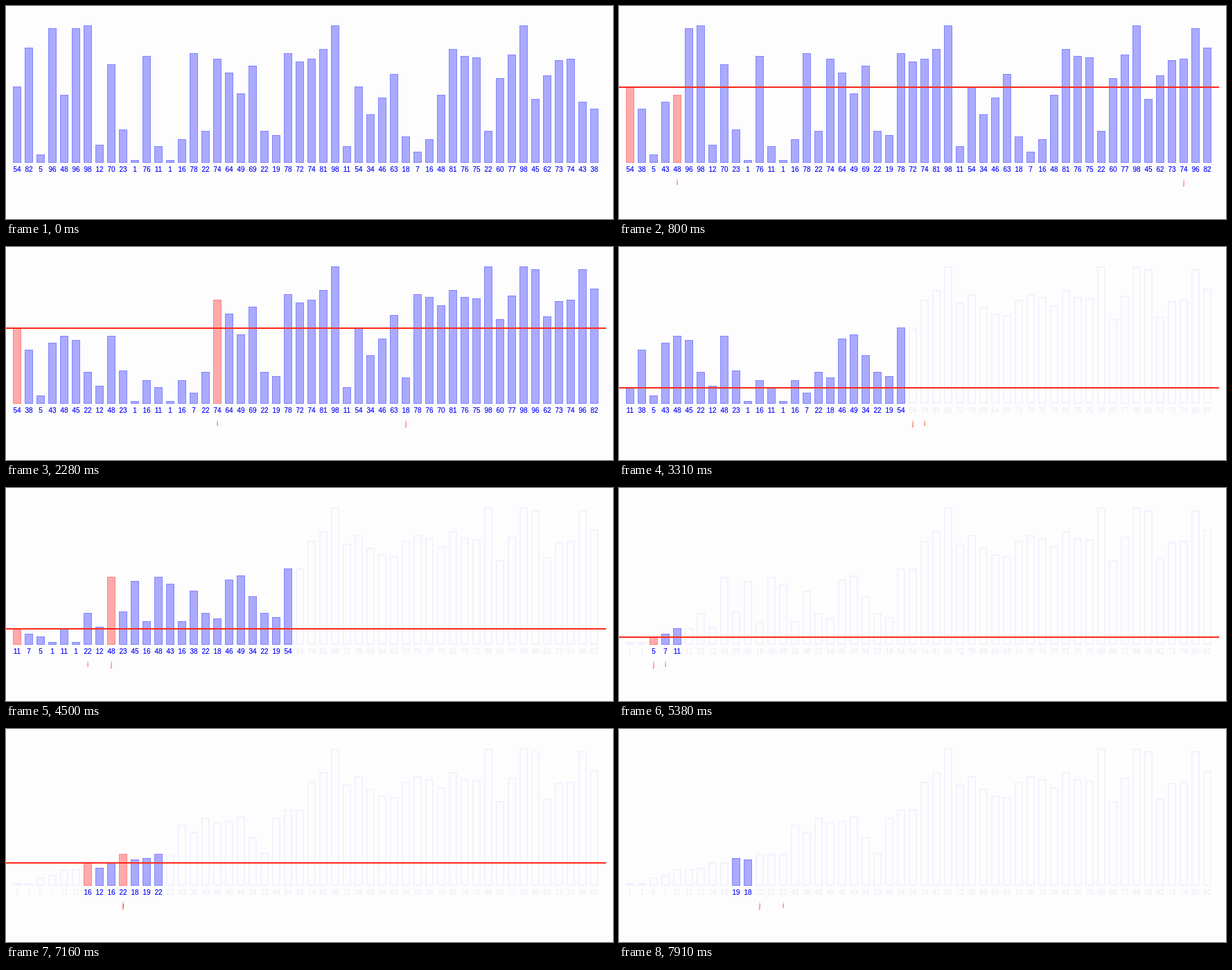
These frames come from a looping animation (876x307 px, 8 s). An HTML page:

```html
<!DOCTYPE html>
<html lang="en">
<head>
<meta charset="utf-8">
<title>Quicksort</title>
<style>
  html, body { margin: 0; width: 100%; height: 100%; overflow: hidden; background: #fdfdfd; }
  svg { display: block; width: 100%; height: 100%; }
  text { font: 10px "Liberation Sans", Arial, sans-serif; text-anchor: middle; }
  .bar rect { fill: #aaf; stroke: #8486ff; }
  .bar text { fill: #00f; stroke: #00f; stroke-width: .15; }
  .hot rect { fill: #faa; stroke: #ff8484; }
  .dim rect { fill: #fdfdfd; stroke: #f2f2ff; stroke-width: 2; }
  .dim text { fill: #e9e9f6; stroke: none; }
  .mark { fill: #ff3a2a; }
  .line { stroke: #ff2a1c; stroke-width: 2; }
</style>
</head>
<body>
<svg id="stage" viewBox="0 0 876 307"></svg>
<script>
const LOOP = 8000;
const DATA = [
  54, 82, 5, 96, 48, 96, 98, 12, 70, 23, 1, 76, 11, 1, 16, 78, 22, 74, 64, 49, 69, 22, 19, 78, 72,
  74, 81, 98, 11, 54, 34, 46, 63, 18, 7, 16, 48, 81, 76, 75, 22, 60, 77, 98, 45, 62, 73, 74, 43, 38
];
// time in ms, number of picture updates so far, sorting step reached
const PACE = [
  [500, 1, 1.5], [1390, 7, 29.6], [2280, 13, 59.3], [3310, 20, 93.2],
  [5380, 34, 160.3], [6410, 41, 191.7], [7910, 51, 240.3]
];

// Each sorting step leaves two shots: before and after its moves.
const shots = [];
const state = { a: DATA, lo: 0, hi: DATA.length - 1, line: null, i: null, j: null, hot: [] };

function step(moves = {}) {
  shots.push({ ...state });
  Object.assign(state, moves);
  shots.push({ ...state });
  state.hot = [];
}

function swapped(p, q) {
  const a = [...state.a];
  [a[p], a[q]] = [a[q], a[p]];
  return a;
}

function sort(lo, hi) {
  state.lo = lo;
  state.hi = hi;
  if (hi <= lo) return;
  step();
  const pivot = state.line = state.a[lo];
  let i = lo + 1, j = hi;
  const compare = n => { state.hot = [lo, n]; step(); };
  step({ i, j });
  while (i <= j) {
    compare(i);
    while (i <= j && state.a[i] < pivot) {
      step({ i: ++i });
      compare(i);
    }
    compare(j);
    while (j >= i && state.a[j] > pivot) {
      step({ j: --j });
      compare(j);
    }
    if (i <= j) {
      const a = swapped(i, j);
      step({ a, i: ++i, j: --j });
    }
  }
  step({ a: swapped(lo, j) });
  step();
  state.line = null;
  sort(lo, j - 1);
  sort(j + 1, hi);
}

sort(0, DATA.length - 1);

const stage = document.getElementById("stage");
const xOf = n => 16 + 17 * n;

function add(parent, tag, attrs) {
  const el = document.createElementNS("http://www.w3.org/2000/svg", tag);
  set(el, attrs);
  return parent.appendChild(el);
}

function set(el, attrs) {
  for (const key in attrs) el.setAttribute(key, attrs[key]);
}

const bars = DATA.map((_, n) => {
  const g = add(stage, "g", { class: "bar" });
  return {
    g,
    rect: add(g, "rect", {}),
    text: add(g, "text", { x: xOf(n), y: 238.5 })
  };
});
const line = add(stage, "line", { class: "line", x1: 0, x2: 866 });
const marks = ["i", "j"].map(name => {
  const el = add(stage, "text", { class: "mark", y: 257.5 });
  el.textContent = name;
  return { name, el };
});

function shotAt(t) {
  if (t < PACE[0][0]) return shots[0];
  let n = PACE.length - 1;
  while (PACE[n][0] > t) n--;
  const [t0, k0, s0] = PACE[n];
  let s = s0;
  if (n < PACE.length - 1) {
    const [t1, k1, s1] = PACE[n + 1];
    const count = k1 - k0;
    s += (s1 - s0) * Math.floor((t - t0) / (t1 - t0) * count + 1e-6) / count;
  }
  return shots[Math.floor(s * 2)];
}

function draw(shot) {
  bars.forEach(({ g, rect, text }, n) => {
    const v = shot.a[n];
    const dim = n < shot.lo || n > shot.hi;
    const inset = dim ? 0.5 : 0;
    set(g, { class: "bar" + (dim ? " dim" : shot.hot.includes(n) ? " hot" : "") });
    set(rect, {
      x: xOf(n) - 5.5 + inset,
      y: 224.5 - 2 * v + inset,
      width: 11 - 2 * inset,
      height: 2 * v + 1 - 2 * inset
    });
    text.textContent = v;
  });
  const y = 225 - 2 * shot.line;
  set(line, { y1: y, y2: y, visibility: shot.line === null ? "hidden" : "visible" });
  for (const { name, el } of marks) {
    const at = shot[name];
    set(el, { x: xOf(at), visibility: at === null ? "hidden" : "visible" });
  }
}

let start = null, last = null;
function tick(now) {
  if (start === null) start = now;
  const shot = shotAt((now - start) % LOOP);
  if (shot !== last) draw(last = shot);
  requestAnimationFrame(tick);
}
draw(shots[0]);
requestAnimationFrame(tick);
</script>
</body>
</html>
```
